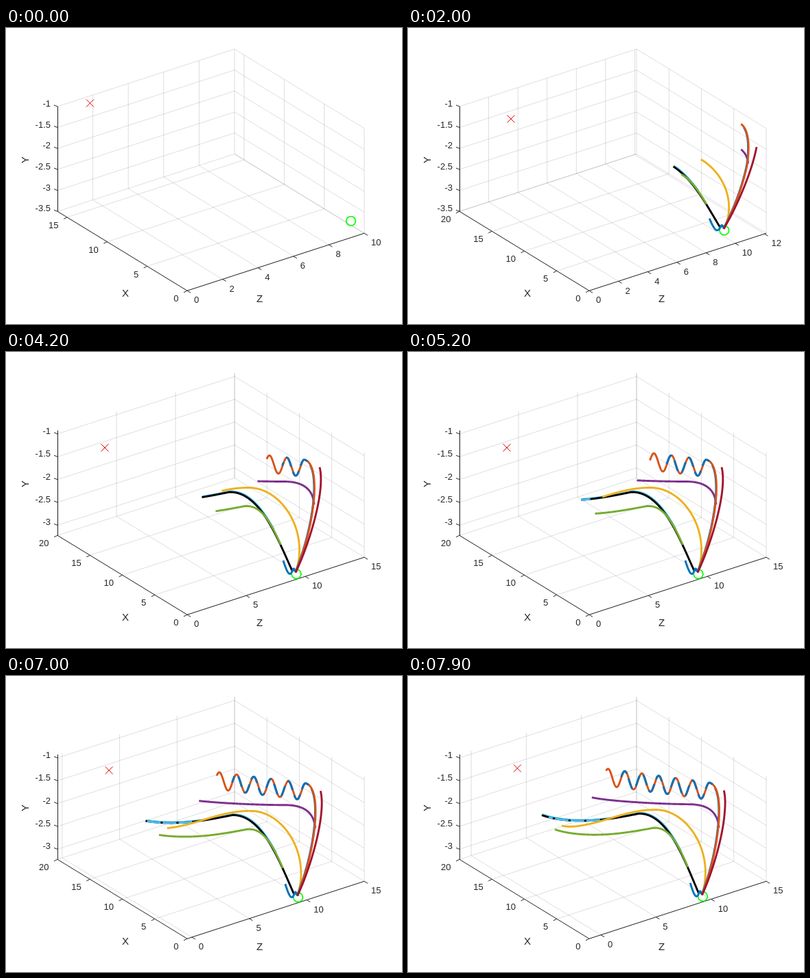
An HTML page with a canvas that plays this animation: 577 by 433 pixels, repeating every 8 s.

```html
<!DOCTYPE html>
<html lang="en">
<head>
<meta charset="utf-8">
<title>3D trajectories</title>
<style>
html, body { margin: 0; width: 100%; height: 100%; overflow: hidden; background: #fff; }
canvas { display: block; }
</style>
</head>
<body>
<canvas id="plot"></canvas>
<script>
const W = 577, H = 433, LOOP = 8000, STEP = 100, BEGIN = 100;
const canvas = document.getElementById('plot');
const ctx = canvas.getContext('2d');
const dpr = window.devicePixelRatio || 1;
canvas.width = W * dpr;
canvas.height = H * dpr;
canvas.style.width = W + 'px';
canvas.style.height = H + 'px';

const INK = '#262626', GRID = 'rgba(38,38,38,0.15)';
const BLUE = '#0072bd', ORANGE = '#d95319', YELLOW = '#edb120', PURPLE = '#7e2f8e';
const GREEN = '#77ac30', SKY = '#4dbeee', MAROON = '#a2142f', BLACK = '#000';

// Axis box: front corner and the extent of each axis in pixels
const OX = 264, OY = 384.3, ZW = 258, ZH = 84, XW = 189, XH = 116, YH = 153.5;
const REF = { x1: 20, y0: -3.223, y1: -0.925, z0: 0, z1: 15 };

const lerp = (a, b, k) => a + (b - a) * Math.min(1, Math.max(0, k));

function project(a, x, y, z) {
  const u = (z - a.z0) / (a.z1 - a.z0), v = x / a.x1, w = (y - a.y0) / (a.y1 - a.y0);
  return [OX + ZW * u - XW * v, OY - ZH * u - XH * v - YH * w];
}

// Data position of a pixel in the REF axes when its z is known
function unproject(px, py, z) {
  const u = z / REF.z1, v = (OX + ZW * u - px) / XW;
  const w = (OY - ZH * u - XH * v - py) / YH;
  return [v * REF.x1, REF.y0 + w * (REF.y1 - REF.y0), z];
}

function axesAt(t) {
  if (t < BEGIN) return { x1: 16.2, y0: -3.5, y1: -1, z0: 0, z1: 10, zs: 2 };
  if (t < 2100) {
    return { x1: 20, y0: -3.5, y1: -1, z0: 0, z1: lerp(12, 12.12, (t - 1700) / 300), zs: 2 };
  }
  const shift = t < 6600 ? 0 : 17 * (t - 6400) / 1500;
  return {
    x1: 20, y0: -3.223, y1: lerp(-0.937, -0.925, (t - 3000) / 800),
    z0: -15 * shift / (ZW - shift), z1: 15, zs: 5
  };
}

function bezier(a, b, c, d, k) {
  const m = 1 - k;
  return a.map((_, i) => m * m * m * a[i] + 3 * m * m * k * b[i] + 3 * m * k * k * c[i] + k * k * k * d[i]);
}

// A limb rises along a Bezier curve until `end`, then follows `glide` (seconds -> offset)
function limb(curve, end, depth, glide) {
  const path = [], top = curve[3];
  for (let t = BEGIN; t < LOOP; t += 10) {
    if (t > end && !glide) break;
    let p;
    if (t <= end) {
      p = bezier(...curve, Math.pow((t - BEGIN) / (end - BEGIN), 0.8));
    } else {
      const [dx, dy] = glide((t - end) / 1000);
      p = [top[0] + dx, top[1] + dy];
    }
    path.push({ t, pos: unproject(...p, depth(...p)) });
  }
  return path;
}

// Steady walk that slows down near the end
const walk = s => -33 * s + 4 * Math.max(0, s - 3.1) ** 2;
const sag = (depth, s) => depth * Math.sin(Math.PI * s / 5.6);

const nearZ = px => 9.25 - 0.0445 * (418 - px);
const midZ = px => 8.6 + 0.03 * (px - 387);
const farZ = (px, py) => 11 + 0.03 * (px - 435) - 0.0135 * Math.max(0, py - 225);
const sideZ = (px, py) => Math.min(12.12, 12.12 - 0.023 * (py - 199));

const NEAR = [417.5, 321], FAR = [422, 322.5];

const black = limb([NEAR, [396, 274], [370, 203], [325, 205]], 3000, nearZ,
  s => [walk(s), sag(12, s)]);
const green = limb([NEAR, [392, 264], [378, 220], [345, 226]], 3000, nearZ,
  s => [walk(s), sag(11, s)]);
const yellow = limb([FAR, [443, 262], [401, 197], [352, 198.5]], 3000, midZ,
  s => [0.95 * walk(s), 13 * (1 - Math.cos(Math.PI * s / 4.3))]);
const purple = limb([FAR, [461, 232], [460, 190], [406, 189.5]], 3000, farZ,
  s => [walk(s), -0.35 * s * s]);
const wave = limb([FAR, [452, 248], [459, 164], [435, 157.5]], 2180, farZ,
  s => [-27.3 * s, 12.5 - 3.3 * s - 12.5 * Math.cos(2 * Math.PI * s / 0.935)]);
const maroon = limb([FAR, [440, 285], [466, 205], [457, 168.5]], 2700, sideZ);
const zigzag = limb([[421, 321], [417, 304], [417, 348], [404, 305]], 1100, nearZ);

const startPos = unproject(423, 324.7, 9.25);
const goalPos = unproject(144, 140, 1.45);

function line(p, q, color) {
  ctx.strokeStyle = color;
  ctx.lineWidth = 1;
  ctx.beginPath();
  ctx.moveTo(...p);
  ctx.lineTo(...q);
  ctx.stroke();
}

function ticks(lo, hi, step) {
  const out = [];
  for (let i = Math.ceil(lo / step - 1e-6); i * step <= hi + 1e-6; i++) out.push(i * step);
  return out;
}

function label(value, x, y, align) {
  ctx.textAlign = align;
  ctx.fillText(String(value), x, y);
}

function drawAxes(a) {
  const at = (x, y, z) => project(a, x, y, z);
  const xs = ticks(0, a.x1, 5), ys = ticks(a.y0, a.y1, 0.5), zs = ticks(a.z0, a.z1, a.zs);
  for (const x of xs) {
    line(at(x, a.y0, a.z0), at(x, a.y0, a.z1), GRID);
    line(at(x, a.y0, a.z1), at(x, a.y1, a.z1), GRID);
  }
  for (const z of zs) {
    line(at(0, a.y0, z), at(a.x1, a.y0, z), GRID);
    line(at(a.x1, a.y0, z), at(a.x1, a.y1, z), GRID);
  }
  for (const y of ys) {
    line(at(a.x1, y, a.z0), at(a.x1, y, a.z1), GRID);
    line(at(a.x1, y, a.z1), at(0, y, a.z1), GRID);
  }
  const front = at(0, a.y0, a.z0), left = at(a.x1, a.y0, a.z0);
  line(front, left, INK);
  line(front, at(0, a.y0, a.z1), INK);
  line([75.5, left[1]], [75.5, left[1] - YH], INK);

  ctx.fillStyle = INK;
  ctx.font = '13px "Liberation Sans", Arial, sans-serif';
  ctx.textBaseline = 'middle';
  for (const x of xs) {
    const [px, py] = at(x, a.y0, a.z0);
    line([px, py], [px - 5, py + 2.5], INK);
    label(x, px - 12.5, py + 12.5, 'right');
  }
  for (const z of zs) {
    const [px, py] = at(0, a.y0, z);
    line([px, py], [px + 5, py + 3], INK);
    label(z, px + 10, py + 14.5, 'left');
  }
  for (const y of ys) {
    const [px, py] = at(a.x1, y, a.z0);
    line([px, py], [px - 5, py - 2], INK);
    label(y, 65, py - 3.5, 'right');
  }
  ctx.font = '15px "Liberation Sans", Arial, sans-serif';
  label('X', 174, 388.5, 'center');
  label('Z', 369.5, 396.5, 'center');
  ctx.save();
  ctx.translate(28.5, 193);
  ctx.rotate(-Math.PI / 2);
  label('Y', 0, 0, 'center');
  ctx.restore();
}

function drawMarkers(a) {
  const [gx, gy] = project(a, ...goalPos), [sx, sy] = project(a, ...startPos);
  line([gx - 5.5, gy - 5.5], [gx + 5.5, gy + 5.5], '#e80000');
  line([gx + 5.5, gy - 5.5], [gx - 5.5, gy + 5.5], '#e80000');
  ctx.strokeStyle = '#0f0';
  ctx.lineWidth = 1.6;
  ctx.beginPath();
  for (let i = 0; i < 10; i++) {
    const r = i * Math.PI / 5;
    ctx.lineTo(sx + 7 * Math.cos(r), sy + 7 * Math.sin(r));
  }
  ctx.closePath();
  ctx.stroke();
}

function trail(a, path, color, from, to, { dx = 0, dy = 0, dash = [] } = {}) {
  ctx.strokeStyle = color;
  ctx.lineWidth = 2.9;
  ctx.lineJoin = 'round';
  ctx.setLineDash(dash);
  ctx.beginPath();
  for (const { t, pos } of path) {
    if (t < from || t > to) continue;
    const [px, py] = project(a, ...pos);
    ctx.lineTo(px + dx, py + dy);
  }
  ctx.stroke();
  ctx.setLineDash([]);
}

function draw(t) {
  const a = axesAt(t);
  ctx.setTransform(dpr, 0, 0, dpr, 0, 0);
  ctx.fillStyle = '#fff';
  ctx.fillRect(0, 0, W, H);
  drawAxes(a);
  drawMarkers(a);
  if (t < BEGIN) return;
  trail(a, black, SKY, 1000, t, { dx: 0.8, dy: -1 });
  trail(a, black, BLACK, 0, t);
  trail(a, black, SKY, 4800, Math.min(t, 7400), { dash: [20, 3] });
  trail(a, yellow, YELLOW, 0, t);
  trail(a, purple, PURPLE, 1300, t);
  trail(a, green, GREEN, 600, t);
  trail(a, wave, BLUE, 0, Math.min(t, 1800), { dx: -0.6 });
  trail(a, wave, ORANGE, 0, t);
  trail(a, wave, BLUE, 2000, t - 850, { dx: -0.4, dash: [16, 8] });
  trail(a, zigzag, BLUE, 0, t);
  trail(a, maroon, MAROON, 0, t);
}

const begin = performance.now();
function tick() {
  const t = (performance.now() - begin) % LOOP;
  draw(Math.floor(t / STEP) * STEP);
  requestAnimationFrame(tick);
}
tick();
</script>
</body>
</html>
```
